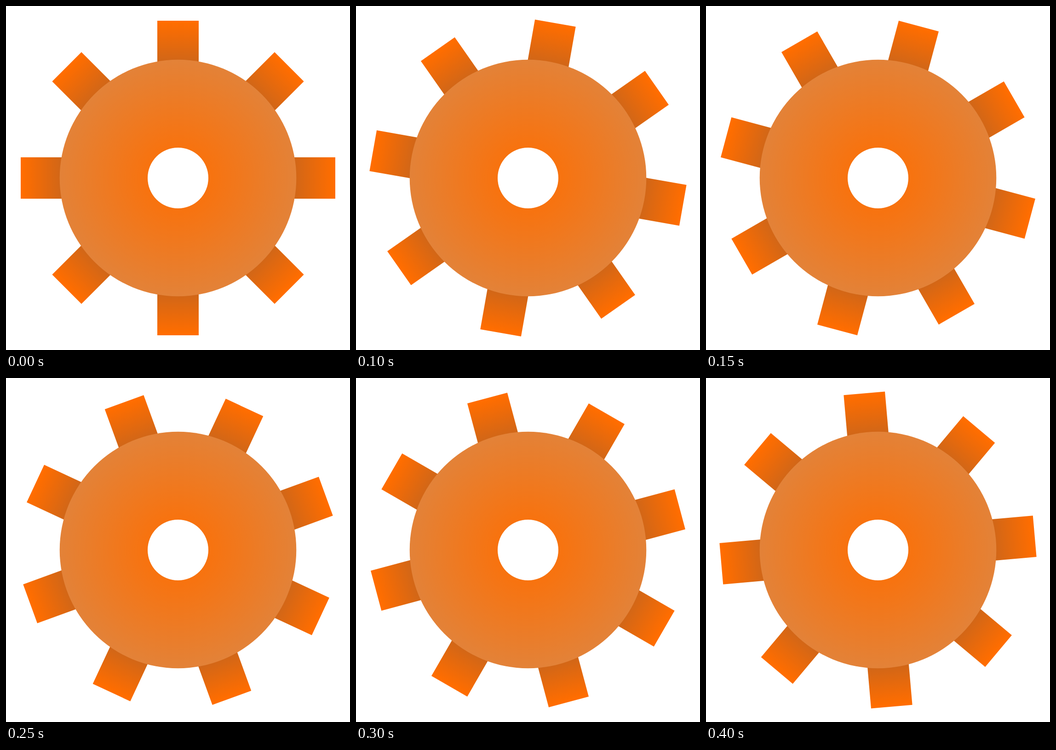
These frames come from a looping animation (748x748 px, 0.45 s). An HTML page:

```html
<!DOCTYPE html>
<html lang="en">
<head>
<meta charset="utf-8">
<title>Turning gear</title>
<style>
  html, body { margin: 0; width: 100%; height: 100%; overflow: hidden; background: #fff; }
  svg { display: block; width: 100%; height: 100%; }
</style>
</head>
<body>
<svg viewBox="0 0 748 748">
  <defs>
    <linearGradient id="toothFill" gradientUnits="userSpaceOnUse" x1="0" y1="-338" x2="0" y2="-252">
      <stop offset="0" stop-color="#ff6d00"/>
      <stop offset="1" stop-color="#d06618"/>
    </linearGradient>
    <radialGradient id="discFill" gradientUnits="userSpaceOnUse" cx="0" cy="0" r="257">
      <stop offset="0" stop-color="#ff6d00"/>
      <stop offset="1" stop-color="#e38238"/>
    </radialGradient>
  </defs>
  <g transform="translate(374 374)">
    <g id="teeth"></g>
    <circle r="257.3" fill="url(#discFill)"/>
    <circle r="66" fill="#fff"/>
  </g>
</svg>
<script>
  const TEETH = 8, STEP_MS = 50, STEP_DEG = 5, LOOP_MS = 450;
  const teeth = document.getElementById('teeth');

  for (let i = 0; i < TEETH; i++) {
    const tooth = document.createElementNS('http://www.w3.org/2000/svg', 'rect');
    const attrs = {
      x: -45, y: -342, width: 90, height: 142,
      fill: 'url(#toothFill)',
      transform: `rotate(${i * 360 / TEETH})`
    };
    for (const key in attrs) tooth.setAttribute(key, attrs[key]);
    teeth.appendChild(tooth);
  }

  // One loop advances the gear by exactly one tooth, in hard steps.
  function render(ms) {
    const step = Math.floor((ms % LOOP_MS) / STEP_MS);
    teeth.setAttribute('transform', `rotate(${step * STEP_DEG})`);
  }

  const start = performance.now();
  function tick() {
    render(performance.now() - start);
    requestAnimationFrame(tick);
  }
  tick();
</script>
</body>
</html>
```
